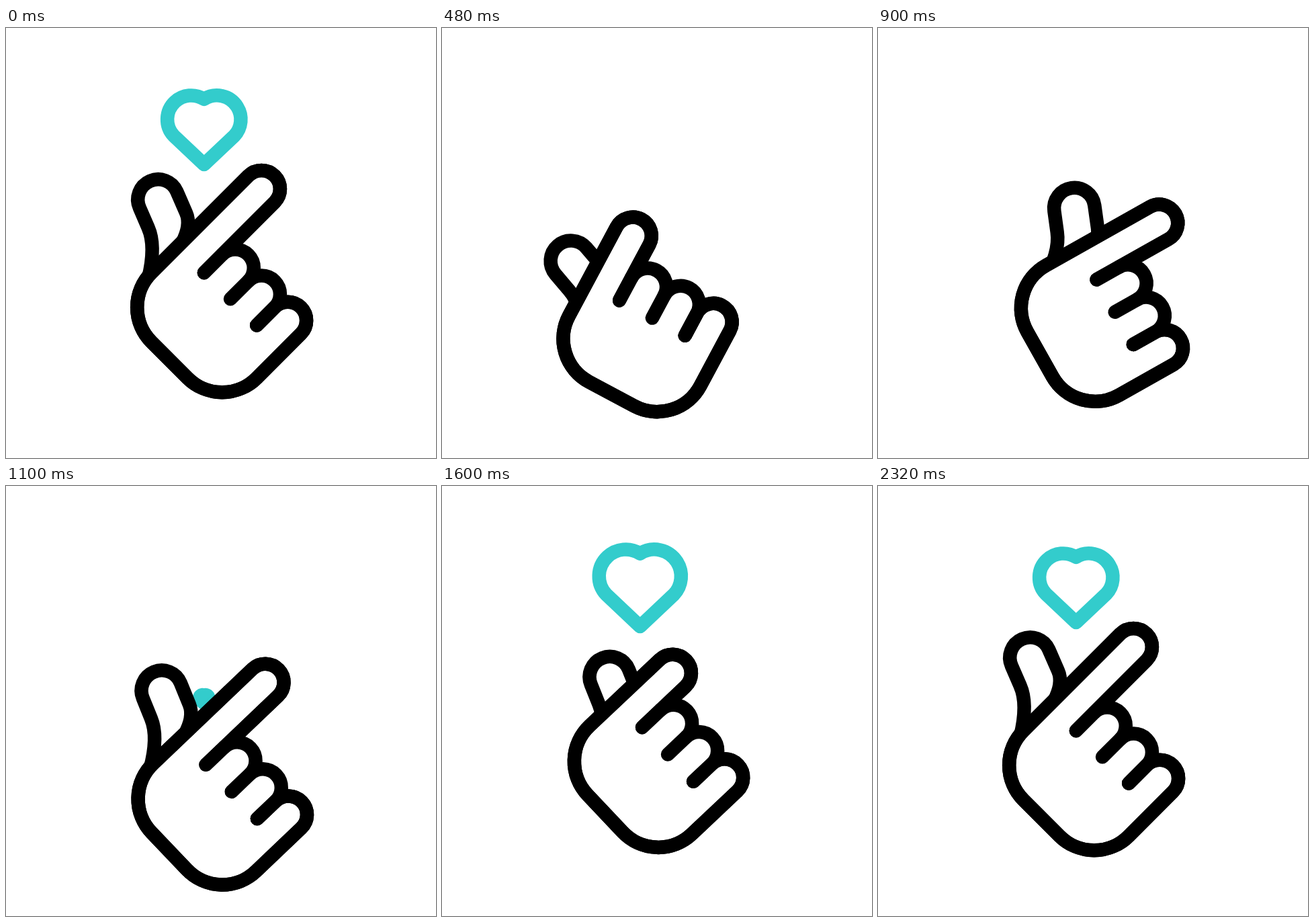
Recreate the animation shown at these times as an HTML page with a canvas. Size 640 by 640 pixels, loop 2400 ms.

```html
<!DOCTYPE html>
<html lang="en">
<head>
<meta charset="utf-8">
<title>Finger heart</title>
<style>
  html, body { margin: 0; width: 100%; height: 100%; overflow: hidden; background: #fff; }
  canvas { display: block; width: 640px; height: 640px; }
</style>
</head>
<body>
<canvas id="stage" width="640" height="640"></canvas>
<script>
const ctx = document.getElementById('stage').getContext('2d');
const LOOP = 2400, STEP = 20, STROKE = 20.5;
const INK = '#000', TEAL = '#33cccc';
const LIFT_BEAT = 356, TILT_BEAT = 427;

const mix = (a, b, p) => a + (b - a) * p;

// Smooth progress from 0 to 1 between two times.
function ease(t, start, end) {
  const x = Math.min(1, Math.max(0, (t - start) / (end - start)));
  return x * x * (3 - 2 * x);
}

// Swings from rest through evenly spaced poses and back to rest.
function swing(t, beat, ...poses) {
  const stops = [0, ...poses, 0];
  const i = Math.min(Math.floor(t / beat), poses.length);
  return mix(stops[i], stops[i + 1], ease(t, i * beat, (i + 1) * beat));
}

function poseAt(t) {
  const appear = ease(t, 1017, 1440);
  const shown = 1 - ease(t, 130, 610) + appear;
  return {
    lift: swing(t, LIFT_BEAT, 53, -33, 53, -22, 14),
    tilt: swing(t, TILT_BEAT, -18.3, 16.4, -8.1, 3.5) * Math.PI / 180,
    curl: ease(t, 45, 590) - ease(t, 650, 1107) + ease(t, 1172, 1625) - ease(t, 1865, 2325),
    heartSize: shown + 0.2 * (appear - ease(t, 1440, 1800)),
    heartDrop: 184 * (1 - shown)
  };
}

function drawHeart(size, drop) {
  if (size < 0.01) return;
  const cx = 294.8, cy = 151.7 + drop;
  const lobeX = 19 * size, lobeY = cy - 15.6 * size, r = 35.7 * size;
  const notch = Math.acos(lobeX / r), side = Math.PI * 0.76;
  ctx.beginPath();
  ctx.moveTo(cx, cy + 51.3 * size);
  ctx.arc(cx - lobeX, lobeY, r, side, 2 * Math.PI - notch);
  ctx.arc(cx + lobeX, lobeY, r, Math.PI + notch, 3 * Math.PI - side);
  ctx.closePath();
  ctx.strokeStyle = TEAL;
  ctx.stroke();
}

// The origin is the centre of the thumb's round tip, its sides lean by a fixed angle.
function drawThumb(curl) {
  const lean = 24 * Math.PI / 180, r = 30.25;
  ctx.save();
  ctx.rotate(-Math.PI / 4);
  ctx.translate(-95.2 + 18.1 * curl, -213.9 + 35.4 * curl);
  ctx.beginPath();
  ctx.moveTo(-14.5, 116.5);
  ctx.quadraticCurveTo(-3, 68.5, -15, 41.5);
  ctx.arc(0, 0, r, Math.PI - lean, 2 * Math.PI - lean);
  ctx.lineTo(41.5, 19.5);
  ctx.quadraticCurveTo(49.5, 37.5, 35.5, 64.5);
  ctx.fill();
  ctx.lineCap = 'butt';
  ctx.stroke();
  ctx.restore();
}

// Upright hand; the origin is the centre of the lower right palm corner.
function drawPalm(curl) {
  const corner = 72.8, finger = 55.4, r = finger / 2;
  const left = corner - 4 * finger, knuckle = -93.1, crease = -55.4;
  const tip = -203.9 + 60.7 * curl;
  const edge = i => left + i * finger;

  ctx.beginPath();
  ctx.moveTo(edge(1), crease);
  ctx.arc(edge(0.5), tip, r, 0, Math.PI, true);
  ctx.arc(left + corner, 0, corner, Math.PI, Math.PI / 2, true);
  ctx.arc(0, 0, corner, Math.PI / 2, 0, true);
  ctx.arc(edge(3.5), knuckle, r, 0, Math.PI, true);
  ctx.lineTo(edge(3), crease);
  ctx.fill();
  ctx.stroke();

  const middleFingers = [1, 2].map(i => {
    const path = new Path2D();
    path.arc(edge(i + 0.5), knuckle, r, Math.PI, 0);
    path.lineTo(edge(i + 1), crease);
    return [path, i];
  });
  for (const [, i] of middleFingers) ctx.fillRect(edge(i), knuckle, finger, crease - knuckle + 1);
  for (const [path] of middleFingers) ctx.fill(path);
  ctx.stroke();
  for (const [path] of middleFingers) ctx.stroke(path);
}

function drawHand({ lift, tilt, curl }) {
  ctx.save();
  ctx.translate(321.7 + 5 * Math.sin(tilt), 469.4 + lift);
  ctx.rotate(Math.PI / 4 + tilt);
  ctx.fillStyle = '#fff';
  ctx.strokeStyle = INK;
  drawThumb(curl);
  drawPalm(curl);
  ctx.restore();
}

function render() {
  const t = Math.floor((performance.now() % LOOP) / STEP) * STEP;
  const pose = poseAt(t);
  ctx.fillStyle = '#fff';
  ctx.fillRect(0, 0, 640, 640);
  ctx.lineWidth = STROKE;
  ctx.lineCap = ctx.lineJoin = 'round';
  drawHeart(pose.heartSize, pose.heartDrop);
  drawHand(pose);
  requestAnimationFrame(render);
}
render();
</script>
</body>
</html>
```
